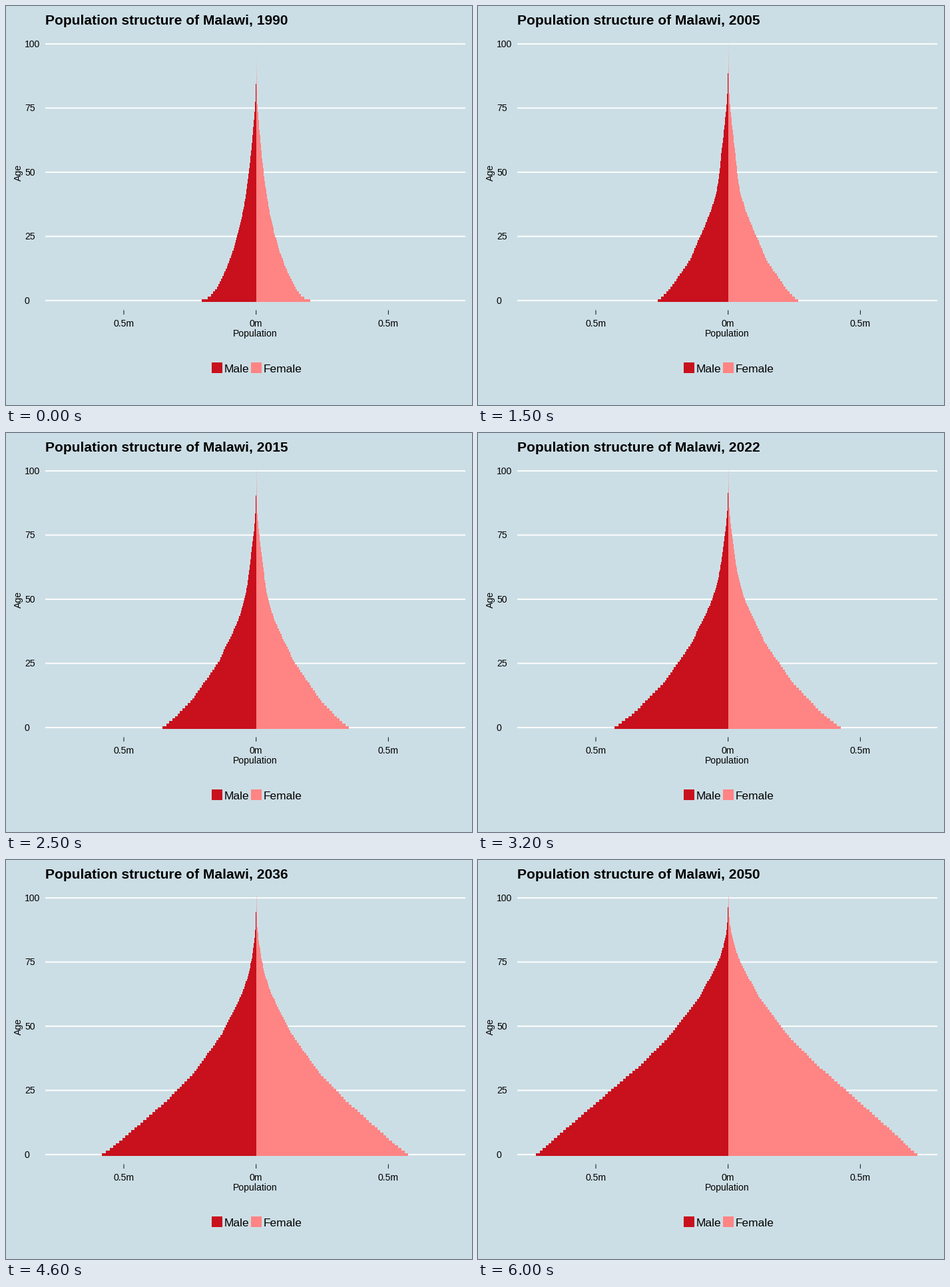
Recreate the animation shown at these times as a matplotlib script. Size 700 px wide and 600 px high, loop 6.1 s.

```python
import numpy as np
import matplotlib.pyplot as plt
from matplotlib.animation import FuncAnimation
from matplotlib.patches import Rectangle

plt.rcParams["font.family"] = "Liberation Sans"

W, H, DPI = 700, 600, 100
PT = 72 / DPI
FIRST, LAST = 1990, 2050
MID, HALF_M = 375.7, 198.7      # zero line and width of 0.5m, in pixels
BASE, AGE_STEP = 442.9, 3.859   # height of age 0 and of one year of age
BG, MALE, FEMALE = "#ccdee5", "#c9101d", "#ff8484"

AGES = np.arange(101)
EDGES = np.round(BASE - AGE_STEP * (np.arange(102) - 0.5))


def births(year):
    """Half-width of the youngest male bar in pixels."""
    return np.interp(year, [1990, 2005, 2015, 2028, 2044, 2050],
                     [81.7, 105.7, 140.7, 196.7, 266.7, 288.7])


def start_profile():
    decay = 71 * np.exp(-0.0367 * AGES)
    old_age = np.exp(-0.16 * np.exp(0.115 * (AGES - 60)))
    return decay * old_age + 10.7 * np.exp(-0.9 * AGES)


def hazard(year):
    """Yearly loss rate at each age, falling as health improves."""
    aging = 0.00015 * np.exp(0.083 * AGES - 0.01 * (year - 2015))
    child = (0.07 + 0.93 * np.exp(-(year - FIRST) / 11)) * 0.08 * 0.59 ** AGES
    general = 0.009 * np.clip((2008 - year) / 6, 0, 1)
    midlife = 0.016 * np.clip((2015 - year) / 10, 0, 1)
    bump = np.exp(-((AGES - 37) / 10) ** 2)
    return 0.0006 + aging + child + general + midlife * bump


def simulate():
    """Age every cohort year by year, adding births at the bottom."""
    pop = [start_profile()]
    for year in range(FIRST, LAST):
        alive = pop[-1] * np.exp(-hazard(year))
        pop.append(np.r_[births(year + 1), alive[:-1]])
    return pop


def female_ratio(year):
    trend = 0.01 * (year - FIRST) / (LAST - FIRST)
    return 0.995 - trend + 0.0009 * AGES + 0.1 * np.exp((AGES - 70) / 9)


MALES = simulate()

fig = plt.figure(figsize=(W / DPI, H / DPI), dpi=DPI, facecolor=BG)
ax = fig.add_axes([0, 0, 1, 1])
ax.set_xlim(0, W)
ax.set_ylim(H, 0)
ax.axis("off")


def label(x, y, text, px, **kw):
    return ax.text(x, y, text, fontsize=px * PT, color="black",
                   va="baseline", **kw)


def line(xs, ys, color, px):
    ax.plot(xs, ys, color=color, lw=px * PT, solid_capstyle="butt",
            snap=False, zorder=1)


def bars(color):
    return ax.stairs(np.full(101, 376), EDGES, orientation="horizontal",
                     baseline=376, fill=True, color=color, snap=False,
                     zorder=3)


for age in range(0, 101, 25):
    y = BASE - AGE_STEP * age
    line([59, 690], [y, y], "white", 1.9)
    label(28, y + 5, str(age), 14)

for k, name in [(-1, "0.5m"), (0, "0m"), (1, "0.5m")]:
    x = MID + k * HALF_M
    line([x, x], [457.5, 464], "#222222", 1.1)
    label(x, 482.4, name, 14, ha="center")

label(374.3, 497, "Population", 14, ha="center")
label(22.7, 250.5, "Age", 14, rotation=90, rotation_mode="anchor",
      ha="center")

for x, color, name in [(309, MALE, "Male"), (368, FEMALE, "Female")]:
    ax.add_patch(Rectangle((x, 536), 15.5, 16, color=color, lw=0))
    label(x + 18.6, 551, name, 17.4)

title = label(58.8, 28, "", 21, weight="bold")
male_bars = bars(MALE)
female_bars = bars(FEMALE)


def draw(i):
    year = FIRST + i
    male = MALES[i]
    female = male * female_ratio(year)
    # Bars end on whole pixels; the thin female tip fades out instead.
    right = np.where(female > 0.8, np.round(MID + female),
                     376 + np.sqrt(female))
    male_bars.set_data(values=np.minimum(np.round(MID - male), 376))
    female_bars.set_data(values=right)
    title.set_text(f"Population structure of Malawi, {year}")
    return male_bars, female_bars, title


anim = FuncAnimation(fig, draw, frames=LAST - FIRST + 1, interval=100,
                     repeat=True, repeat_delay=0, blit=False)
plt.show()
```
